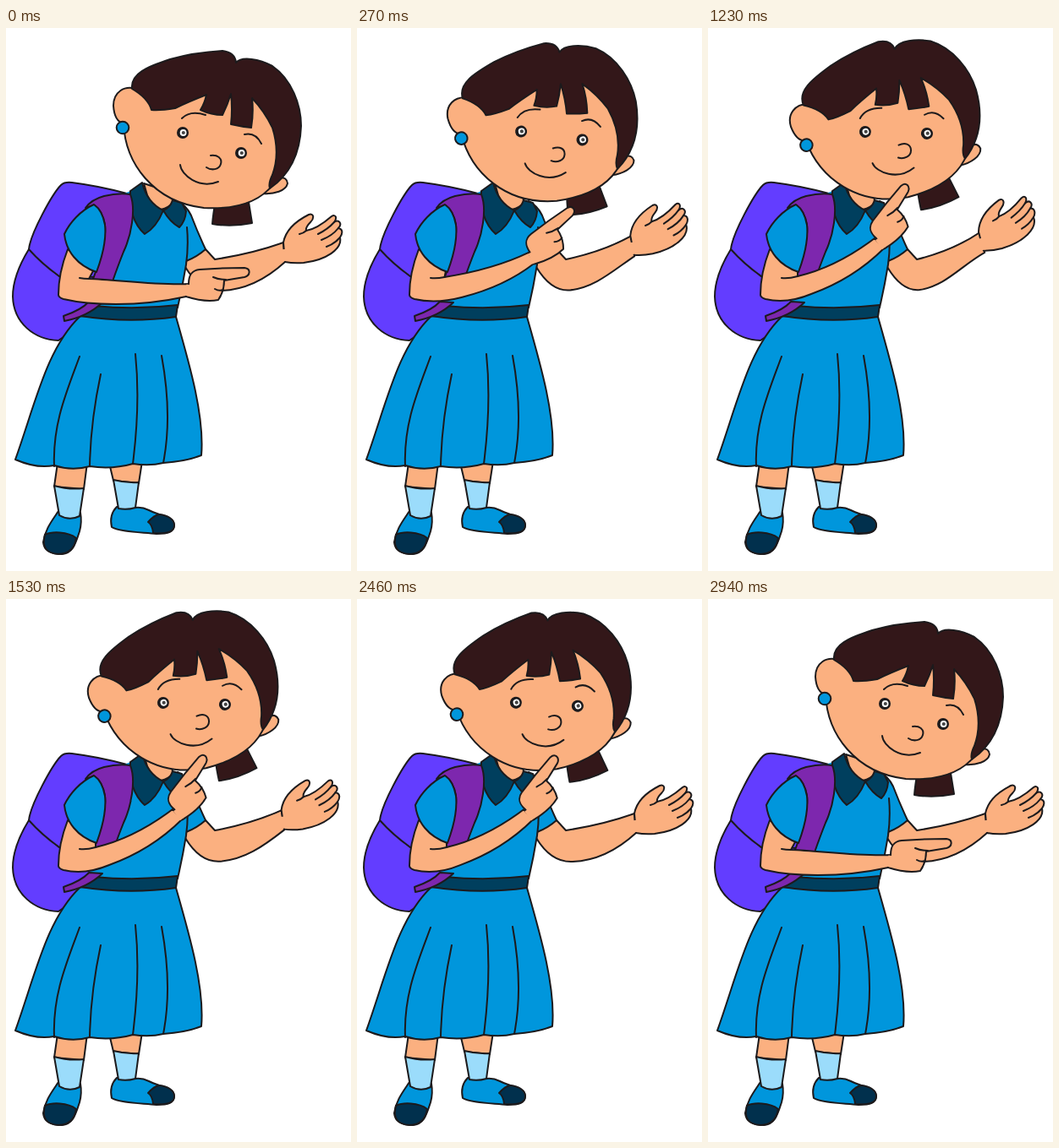
Recreate the animation shown at these times as an HTML page. Size 408 by 643 pixels, loop 3.6 s.

```html
<!DOCTYPE html>
<html lang="en">
<head>
<meta charset="utf-8">
<title>Schoolgirl</title>
<style>
html, body { margin: 0; width: 100%; height: 100%; overflow: hidden; background: #fff; }
svg { display: block; width: 100%; height: 100%; }
path, circle { stroke: #1c1a1c; stroke-width: 2; stroke-linejoin: round; stroke-linecap: round; }
.line { fill: none; }
.skin { fill: #fbb080; }
.blue { fill: #0096dc; }
.navy { fill: #003f5e; }
.toe { fill: #01304d; }
.pack { fill: #633dff; }
.strap { fill: #7d27ae; }
.sock { fill: #9bdcfb; }
.hair { fill: #331719; }
.seam { fill: none; stroke: #fbb080; stroke-width: 5; stroke-linecap: butt; }
.bare { stroke: none; }
</style>
</head>
<body>
<svg viewBox="0 0 408 643">
  <!-- backpack -->
  <path class="pack" d="M27 262C16 280 8 299 8 318C9 350 34 369 62 370L105 340L110 270L63 294Z"/>
  <path class="pack" d="M27 262C29 243 55 196 65 186Q69 182 78 183Q110 187 143 196L110 295L63 294Q42 279 27 262Z"/>

  <!-- legs -->
  <path class="skin" d="M61 515L57 543L92 546L96 515Z"/>
  <path class="skin" d="M122 515L127 536L157 539L161 513Z"/>
  <path class="blue" d="M62 572C54 584 46 594 44 609C45 621 56 623 66 623C80 622 83 608 87 596Q90 585 88 574Z"/>
  <path class="toe" d="M46 600C54 596 73 596 83 604C81 617 74 623 62 623C48 622 42 615 46 600Z"/>
  <path class="sock" d="M57 542Q74 547 92 545L87 578Q75 584 63 577Z"/>
  <path class="blue" d="M131 567C124 574 123 582 125 591C135 597 160 597 178 599C192 599 199 597 199 588C198 578 180 577 169 571Q161 567 153 568Z"/>
  <path class="toe" d="M174 598Q173 588 168 585Q175 577 181 576C192 577 199 582 199 589C199 597 190 599 174 598Z"/>
  <path class="sock" d="M127 535Q142 539 157 538L153 568Q143 571 133 569Z"/>

  <!-- far arm -->
  <path id="farArm" class="skin"/>
  <g id="farHand">
    <path class="skin" d="M328 254C331 238 344 228 358 221C364 219 365 225 360 230Q354 236 355 240C367 238 377 230 385 223C390 220 392 225 388 230C394 226 398 232 393 237C399 238 398 244 395 248C398 262 378 275 352 278Q340 279 330 277Z"/>
    <path class="line" d="M388 230Q381 238 369 244M393 237Q386 246 373 251M395 248Q388 256 379 259M355 240Q352 243 347 244"/>
    <path class="seam" d="M329 262L330 276"/>
  </g>

  <!-- dress -->
  <path class="blue" d="M203 205Q214 211 219 222Q227 243 236 262Q226 271 213 276Z"/>
  <path class="blue bare" d="M147 193L204 206Q215 225 215 250Q214 285 203 331L201 345L88 345L100 320L110 280L120 205Z"/>
  <path class="line" d="M214 236Q216 258 213 280Q209 305 203 331"/>
  <path class="blue" d="M88 341C48 379 35 444 11 511Q36 522 57 518Q78 525 99 519Q125 523 150 516Q170 519 186 515Q214 513 231 506C235 460 217 398 201 342Z"/>
  <path class="line" d="M87 389C72 430 55 468 57 519M112 410Q100 466 99 519M153 386Q159 444 150 516M184 388Q197 459 186 515"/>
  <path class="navy" d="M104 329Q153 334 203 328L201 342Q145 350 88 341Z"/>

  <!-- neck and collar -->
  <path class="skin" d="M163 184L167 198Q172 212 183 215Q193 213 197 206L196 195Z"/>
  <path class="navy" d="M147 193L161 183Q167 207 186 216Q178 236 164 244Q145 227 147 193Z"/>
  <path class="navy" d="M186 216Q194 213 197 204L208 207L213 217Q212 229 205 236Q194 230 186 216Z"/>

  <!-- strap -->
  <path class="strap" d="M94 213Q101 203 116 199Q133 195 147 197C154 215 148 246 139 265Q133 280 126 300L102 300C110 278 119 253 117 233Q114 216 105 210Z"/>
  <path class="strap" d="M68 341Q89 334 98 324L114 325Q96 342 69 347Z"/>

  <g id="head">
    <path class="hair" d="M248 203Q245 220 244 232Q266 236 291 231L286 200Z"/>
    <path class="skin" d="M312 187C319 175 332 174 333 184C331 193 317 197 304 196Z"/>
    <path class="skin" d="M157 73C139 66 127 77 127 92C128 107 134 112 139 113C141 160 174 206 234 213C271 215 300 206 316 185L328 110L280 50L190 52Z"/>
    <path class="hair" d="M149 72C147 54 167 46 194 37Q222 29 256 27Q271 29 272 41C279 33 300 37 315 45C338 61 349 91 349 116C348 145 338 172 312 190Q310 184 315 174C322 155 321 137 315 118Q306 99 291 83Q293 100 290 118Q279 117 266 114Q268 96 266 78Q262 91 256 103Q243 103 230 97Q235 89 237 79Q214 88 200 95Q182 98 172 97Q168 83 149 72Z"/>
    <path class="line" d="M208 107Q218 97 236 103M282 126Q295 123 302 137M242 151C250 150 256 154 254 161C252 168 243 169 237 165M206 162C207 174 228 191 251 182"/>
    <g id="eyes"></g>
    <circle class="blue" cx="138" cy="118" r="7.3"/>
  </g>

  <!-- near arm -->
  <path id="nearArm" class="skin"/>
  <path id="crease" class="line"/>
  <g id="nearHand">
    <path class="skin" d="M216 303C216 293 219 287 229 286Q255 284 282 284C290 285 289 293 282 295Q270 297 258 299Q258 312 251 322Q235 325 213 318Z"/>
    <path class="line" d="M260 298Q252 298 245 295M257 310Q252 312 247 309"/>
    <path class="seam" d="M216 304L213 317"/>
  </g>
  <path class="blue" d="M104 209C88 216 75 231 69 244C71 264 84 281 107 289C113 273 119 251 117 233Q114 216 104 209Z"/>
</svg>
<script>
const LOOP = 3600, STEP = 30;
const el = id => document.getElementById(id);
const clamp = x => Math.min(1, Math.max(0, x));
const span = (t, from, to) => clamp((t - from) / (to - from));
const easeOut = (x, k = 1.5) => 1 - (1 - x) ** k;
const easeInOut = x => x * x * (3 - 2 * x);
const lerp = (a, b, p) => a + (b - a) * p;

// Blend two paths that share the same commands.
function blend([a, b], p) {
  const ends = b.match(/-?\d+/g);
  let i = 0;
  return a.replace(/-?\d+/g, n => lerp(+n, +ends[i++], p).toFixed(2));
}

const farArm = [
  'M236 262L247 274Q292 267 328 254L330 277C306 299 282 310 255 311C235 312 221 298 212 283L213 270Z',
  'M236 262L247 274Q290 263 321 241L327 265C299 280 281 305 250 310C233 312 221 298 212 283L213 270Z'
];
const nearArm = [
  'M73 262C66 280 62 300 62 316Q62 319 68 321C85 325 105 327 130 327C165 327 195 322 213 318L216 303C180 305 130 298 98 297L104 286Z',
  'M73 262C66 280 62 300 62 316Q62 319 68 321C85 325 103 323 122 315C158 302 188 281 208 261L197 249C172 268 140 286 106 294L106 286Z'
];
const crease = ['M87 296Q92 297 98 297', 'M87 296Q95 297 106 294'];

el('eyes').innerHTML = [[209, 124], [278, 148]].map(([x, y]) =>
  `<circle class="bare" cx="${x}" cy="${y}" r="7" fill="#1c1a1c"/>` +
  `<circle class="bare" cx="${x + .6}" cy="${y}" r="3.9" fill="#fff"/>` +
  `<circle class="bare" cx="${x + .8}" cy="${y}" r="2.1" fill="#444"/>`).join('');

function draw(t) {
  const tilt = easeOut(span(t, 0, 540)) - easeOut(span(t, 2430, 2940));
  const near = easeInOut(span(t, 0, 430)) - easeInOut(span(t, 2440, 2900));
  const far = easeOut(span(t, 0, 540), 1.25) - easeOut(span(t, 1200, 1800));

  el('head').setAttribute('transform', `rotate(${-17.6 * tilt} 194 198)`);

  el('farArm').setAttribute('d', blend(farArm, far));
  el('farHand').setAttribute('transform', `rotate(${-10.7 * far} 252 294)`);

  el('nearArm').setAttribute('d', blend(nearArm, near));
  el('crease').setAttribute('d', blend(crease, near));
  el('nearHand').setAttribute('transform',
    `translate(${lerp(214, 204, near)} ${lerp(311, 256, near)}) rotate(${-49 * near}) translate(-214 -311)`);
}

const start = performance.now();
function tick(now) {
  const t = Math.max(0, now - start) % LOOP;
  draw(Math.floor(t / STEP) * STEP);
  requestAnimationFrame(tick);
}
draw(0);
requestAnimationFrame(tick);
</script>
</body>
</html>
```
